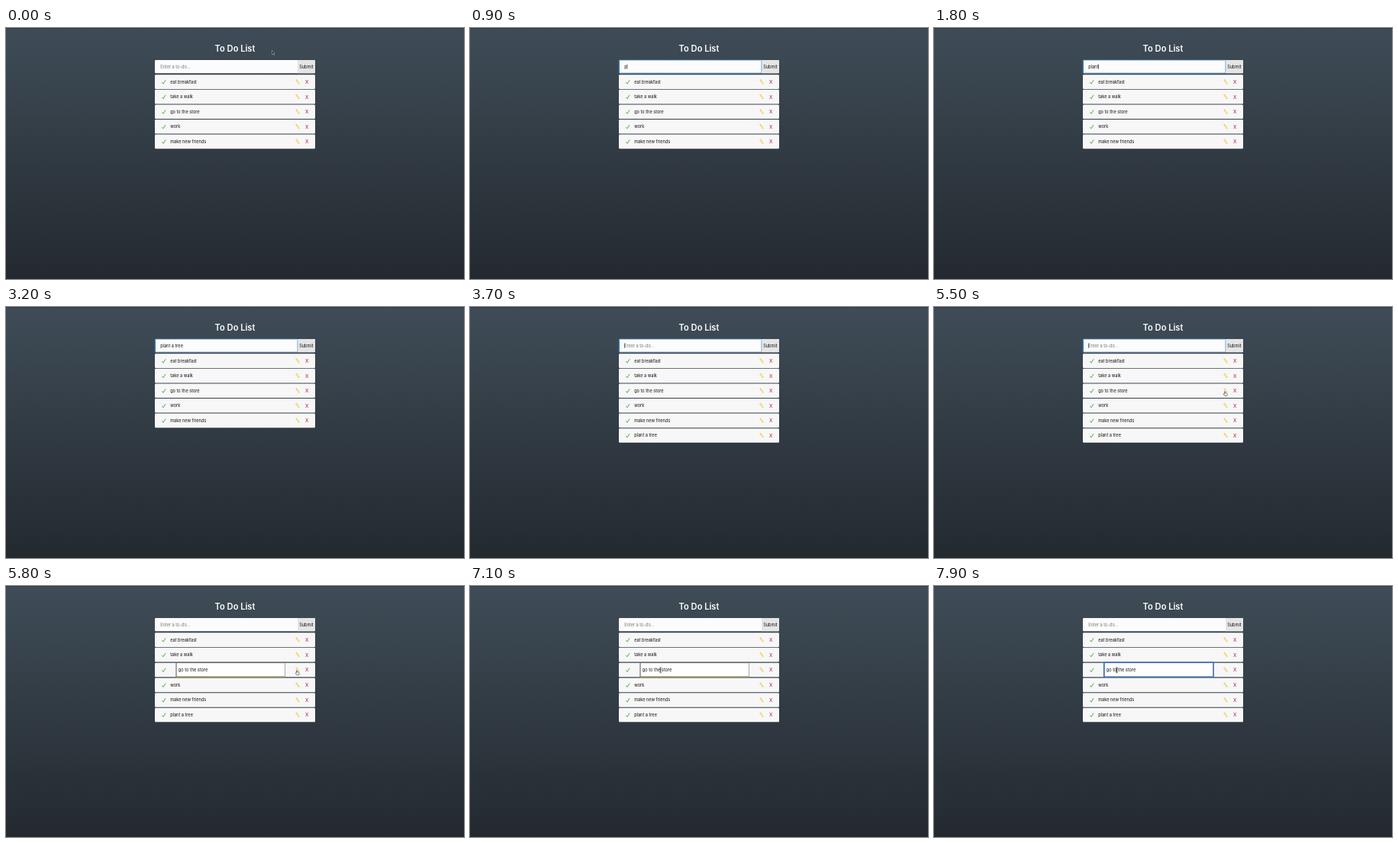
An HTML page that plays this animation: 600x329 px, repeating every 8 s.

```html
<!DOCTYPE html>
<html lang="en">
<head>
<meta charset="utf-8">
<title>To Do List</title>
<style>
html, body { margin: 0; width: 100%; height: 100%; overflow: hidden; background: #303a43; }
svg { display: block; width: 600px; height: 329px; }
text { font: 5.6px Inter, "Open Sans", sans-serif; fill: #111; white-space: pre; }
.title { font-size: 11.1px; font-weight: 600; fill: #fff; text-anchor: middle; }
.hint { fill: #777; }
.x { font-size: 6.4px; fill: #b5112d; text-anchor: middle; }
.caret { stroke: #111; stroke-width: .6; }
</style>
</head>
<body>
<svg viewBox="0 0 600 329">
  <defs>
    <linearGradient id="bg" x2="0" y2="1">
      <stop stop-color="#3f4c57"/><stop offset="1" stop-color="#23292f"/>
    </linearGradient>
    <g id="row">
      <rect x="195" y="-9.3" width="210" height="18.6" rx="1.2" fill="#f7f7f7"/>
      <path d="M204.3 .6l1.7 1.9 3-4.8" fill="none" stroke="#3fa33c" stroke-width=".95"/>
      <path d="M379.5 -2.6l1.3 -.6 3.2 4.4 .3 1.6 -1.5 -.8zM380.3 -1.6l1.2 -.8" fill="#fbe9ac" stroke="#efc552" stroke-width=".6"/>
      <text class="x" x="394.3" y="2.4">X</text>
    </g>
  </defs>
  <rect width="600" height="329" fill="url(#bg)"/>
  <rect width="600" height="1" fill="#2c3b46"/>
  <text class="title" x="300" y="31.2">To Do List</text>

  <rect x="195" y="42" width="210" height="17.2" rx="1.2" fill="#fcfcfc"/>
  <path d="M382 42h21.8q1.2 0 1.2 1.2v14.8q0 1.2 -1.2 1.2H382z" fill="#e5e5e6"/>
  <text x="384.2" y="52.6">Submit</text>
  <g id="focus" fill="none">
    <rect x="195.2" y="42.2" width="186.6" height="16.8" rx="1" stroke="#62a5d8" stroke-width=".8"/>
    <path d="M195.3 42.5v16.2" stroke="#2467ae" stroke-width="1.1"/>
  </g>
  <text id="entry" x="202.2" y="52.6"></text>
  <path id="caret" class="caret" d="M0 47.4v6.4"/>

  <g id="list"></g>
  <g id="edit">
    <rect x="223" y="100.6" width="142.6" height="18.3" fill="#fff" stroke="#858585" stroke-width=".7"/>
    <path d="M223 119v-18.4h142.6" fill="none" stroke="#555" stroke-width=".7"/>
    <path d="M223 119h142.6" stroke="#b39a35" stroke-width=".9"/>
    <rect id="ring" x="222.6" y="100.2" width="143.6" height="19.2" fill="none" stroke="#2f70c9" stroke-width="1.3"/>
    <text x="225.8" y="112">go to the store</text>
    <path id="editCaret" class="caret" d="M239.6 106.8v6.4"/>
  </g>

  <g id="cursor">
    <path id="arrow" d="M0 0v5l1.2 -1 .9 2 .9 -.4 -.9 -1.9h1.6z" fill="#111" stroke="#e8e8e8" stroke-width=".45"/>
    <path id="beam" d="M-1.2 -3.6q1.2 0 1.2 .8v5.6q0 .8 -1.2 .8M1.2 -3.6q-1.2 0 -1.2 .8v5.6q0 .8 1.2 .8" fill="none" stroke="#222" stroke-width=".6"/>
    <path id="hand" d="M-.6 .4q.6 -.7 1.1 0v2l2.2 .4q.8 .3 .6 1.3l-.5 1.9h-3l-1.7 -2.2q.2 -.8 1.3 0z" fill="#fff" stroke="#222" stroke-width=".55"/>
  </g>
</svg>
<script>
const $ = id => document.getElementById(id);
const items = ["eat breakfast", "take a walk", "go to the store", "work", "make new friends", "plant a tree"];
const task = items[5];
// One time per typed character
const keys = [900, 1200, 1400, 1500, 1800, 2000, 2100, 2300, 2600, 2700, 3000, 3100];
// Pointer waypoints: time, x, y
const path = [
  [0, 348.5, 29.5], [400, 314, 54.5], [4500, 314, 54.5], [4700, 376, 80],
  [5000, 385, 102], [5300, 381, 110.5], [6000, 381, 110.5], [6400, 345, 138],
  [6900, 256, 112], [7100, 249.6, 110.2], [7500, 244, 110.2], [7800, 239.4, 110.2], [8000, 239.4, 110.2]
];

$("list").innerHTML = items.map(s =>
  `<g><use href="#row"/><text x="215.2" y="2">${s}</text></g>`).join("");
const rows = [...$("list").children];

const show = (el, on) => el.style.display = on ? "" : "none";
const within = (t, a, b) => t >= a && t < b;

function pointer(t) {
  const i = path.findIndex(p => p[0] > t);
  const [t0, x0, y0] = path[i - 1], [t1, x1, y1] = path[i];
  const k = (t - t0) / (t1 - t0);
  return [x0 + (x1 - x0) * k, y0 + (y1 - y0) * k];
}

function draw(t) {
  const editing = t >= 5800;
  const focused = within(t, 400, 5700);
  const typed = t < 3700 ? task.slice(0, keys.filter(k => k <= t).length) : "";

  const entry = $("entry");
  entry.textContent = typed || "Enter a to-do...";
  entry.setAttribute("class", typed ? "" : "hint");
  show($("focus"), focused);
  const caretX = 202.4 + (typed ? entry.getComputedTextLength() : 0);
  $("caret").setAttribute("transform", `translate(${caretX})`);
  show($("caret"), focused && !within(t, 3200, 3700) && !within(t, 4200, 4600) && !within(t, 5100, 5500));

  rows.forEach((row, i) => {
    const shift = editing ? (i > 2 ? .6 : i === 2 ? .3 : 0) : 0;
    row.setAttribute("transform", `translate(0 ${70.6 + 19.57 * i + shift})`);
    show(row, i < 5 || t >= 3700);
  });
  show(rows[2].lastChild, !editing);
  show($("edit"), editing);
  show($("ring"), t >= 7800);
  show($("editCaret"), t >= 7900);

  const [x, y] = pointer(t);
  const beam = (x < 382 && within(y, 42, 59)) || (editing && within(x, 223, 366) && within(y, 100, 119));
  const hand = within(x, 378, 386) && within(y, 105, 115);
  $("cursor").setAttribute("transform", `translate(${x} ${y})`);
  show($("cursor"), !within(t, 900, 4500));
  show($("beam"), beam);
  show($("hand"), hand);
  show($("arrow"), !beam && !hand);
}

function tick() {
  draw(Math.floor(performance.now() % 8000 / 100) * 100);
  requestAnimationFrame(tick);
}
tick();
</script>
</body>
</html>
```
